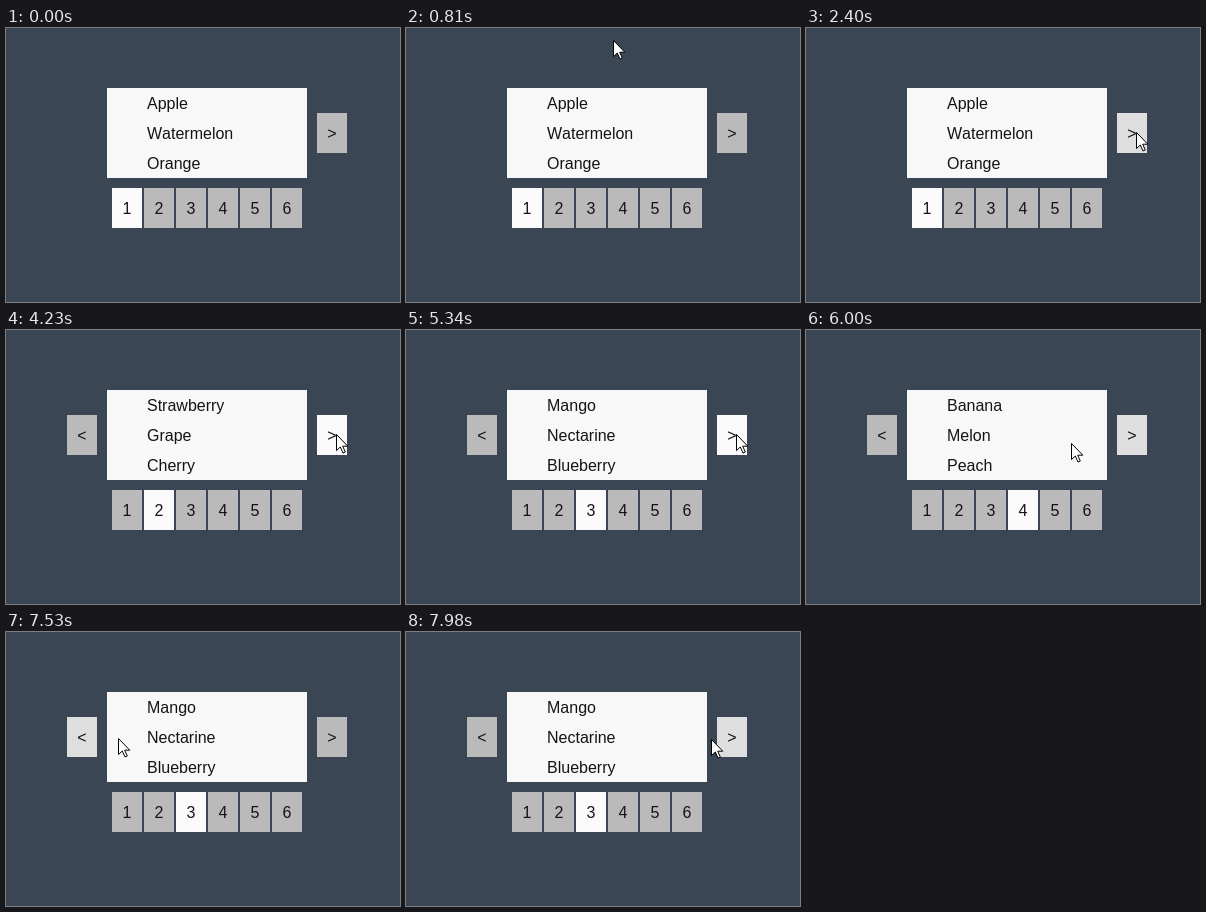
These frames come from a looping animation (394 px wide and 274 px high, 8000 ms). An HTML page:

```html
<!DOCTYPE html>
<html lang="en">
<head>
<meta charset="utf-8">
<title>Paged list</title>
<style>
html, body { margin: 0; width: 100%; height: 100%; overflow: hidden; background: #3a4654; }
svg { display: block; }
text { font: 16px "Liberation Sans", Arial, sans-serif; font-kerning: none; fill: #141414; }
.mid { text-anchor: middle; }
</style>
</head>
<body>
<svg id="stage" width="394" height="274" viewBox="0 0 394 274"></svg>
<script>
const LOOP = 8000, STEP = 30, LAG = 90;
const NORMAL = '#bababa', HOVER = '#dedede', ACTIVE = '#fafafa', PAPER = '#f8f8f8', ROW_HOVER = '#d3d3d3';
const pages = [
  ['Apple', 'Watermelon', 'Orange'],
  ['Strawberry', 'Grape', 'Cherry'],
  ['Mango', 'Nectarine', 'Blueberry'],
  ['Banana', 'Melon', 'Peach']
];

const linear = p => p;
const easeIn = p => p ** 3;
const easeOut = p => 1 - (1 - p) ** 3;
const smooth = p => p * p * (3 - 2 * p);

const clicks = [
  { down: 2820, up: 2940, turn: 1 },
  { down: 4230, up: 4320, turn: 1 },
  { down: 5340, up: 5430, turn: 1 },
  { down: 6720, up: 6810, turn: -1 }
];
// pointer moves: start, end, destination, easing
const moves = [
  [630, 1350, 184, 115, linear],
  [1350, 1530, 184, 132, easeOut],
  [1980, 2400, 330, 104, smooth],
  [5760, 6000, 265, 113, easeIn],
  [6000, 6360, 89, 102, easeOut],
  [6540, 6660, 80, 106, linear],
  [7500, 7650, 240, 106, linear],
  [7770, 7890, 323, 106, linear],
  [7890, 7980, 305, 107, linear]
];

const stage = document.getElementById('stage');
function add(tag, attrs, text = '') {
  const el = document.createElementNS('http://www.w3.org/2000/svg', tag);
  for (const k in attrs) el.setAttribute(k, attrs[k]);
  el.textContent = text;
  return stage.appendChild(el);
}
function button(label, x, y) {
  const box = add('rect', { x, y, width: 30, height: 40 });
  const text = add('text', { x: x + 15, y: y + 26, class: 'mid' }, label);
  return { box, text, x, y };
}

const rows = [0, 1, 2].map(i => ({
  y: 60 + 30 * i,
  box: add('rect', { x: 101, y: 60 + 30 * i, width: 200, height: 30 }),
  text: add('text', { x: 141, y: 81 + 30 * i })
}));
const prev = button('<', 61, 85), next = button('>', 311, 85);
const tabs = [1, 2, 3, 4, 5, 6].map((n, i) => button(n, 106 + 32 * i, 160));
const pointer = add('path', {
  d: 'M.5 .5V16.5L4.3 13L7 19L9.3 18L6.7 12.2H11.8Z', fill: '#fff', stroke: '#000'
});

function pointerAt(t) {
  let x = 214, y = -22;
  for (const [start, end, toX, toY, ease] of moves) {
    const k = ease(Math.min(1, Math.max(0, (t - start) / (end - start))));
    x += (toX - x) * k;
    y += (toY - y) * k;
  }
  return [Math.round(x), Math.round(y)];
}
const paint = (el, fill) => el.setAttribute('fill', fill);

function draw(time) {
  const t = Math.floor(time % LOOP / STEP) * STEP;
  const [x, y] = pointerAt(t);
  const [hx, hy] = pointerAt(t - LAG); // hover follows the pointer slightly late
  const inside = (left, top, w, h) => hx >= left && hx < left + w && hy >= top && hy < top + h;
  const page = clicks.reduce((n, c) => n + (t >= c.up ? c.turn : 0), 0);
  const pressed = clicks.some(c => t >= c.down && t < c.up);

  rows.forEach((row, i) => {
    paint(row.box, inside(101, row.y, 200, 30) ? ROW_HOVER : PAPER);
    row.text.textContent = pages[page][i];
  });
  for (const b of [prev, next]) {
    paint(b.box, !inside(b.x, b.y, 30, 40) ? NORMAL : pressed ? ACTIVE : HOVER);
  }
  for (const el of [prev.box, prev.text]) el.setAttribute('visibility', page ? 'visible' : 'hidden');
  tabs.forEach((tab, i) => paint(tab.box, i === page ? ACTIVE : NORMAL));
  pointer.setAttribute('transform', `translate(${x} ${y})`);
}

const start = performance.now();
function tick() {
  draw(performance.now() - start);
  requestAnimationFrame(tick);
}
tick();
</script>
</body>
</html>
```
